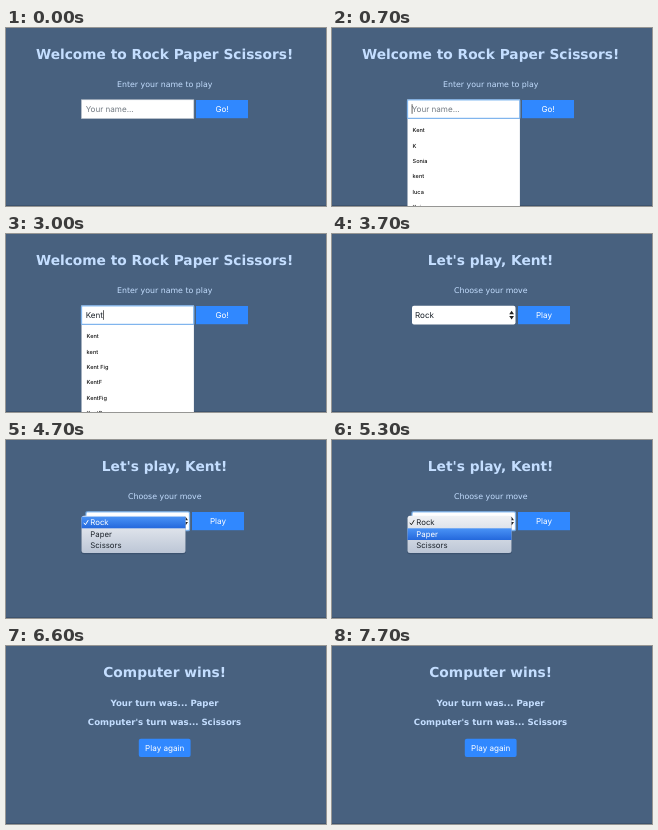
Write an HTML page that moves like this. It is 320x178 px and loops after 8 s.

```html
<!DOCTYPE html>
<html lang="en">
<head>
<meta charset="utf-8">
<title>Rock Paper Scissors</title>
<style>
html, body { margin: 0; height: 100%; overflow: hidden; background: #48617f; }
svg { display: block; width: 100vw; height: 100vh; }
text { font: 8.1px Inter, "Liberation Sans", sans-serif; fill: #1c232b; white-space: pre; text-rendering: geometricPrecision; }
.title, .label, .turn { font-family: "DejaVu Sans", Verdana, sans-serif; fill: #c4deff; text-anchor: middle; }
.title { font-size: 13.75px; font-weight: bold; }
.label { font-size: 7.85px; }
.turn { font-size: 8.6px; font-weight: bold; }
.button { fill: #fff; text-anchor: middle; }
.hint { fill: #747c84; }
.entry { font-size: 5.6px; font-weight: 500; fill: #111; }
.item { font-size: 7.8px; }
.lit { fill: #fff; }
</style>
</head>
<body>
<svg id="stage" viewBox="0 0 320 178" preserveAspectRatio="none"></svg>
<script>
const LOOP = 8000;
const NAME = "Kent";
const MOVES = ["Rock", "Paper", "Scissors"];
const ALL_NAMES = ["Kent", "K", "Sonia", "kent", "luca", "Kai"];
const K_NAMES = ["Kent", "K", "kent", "Kent Fig", "KentF", "KentFig"];
const KE_NAMES = ["Kent", "kent", "Kent Fig", "KentF", "KentFig", "KentB"];
const stage = document.getElementById("stage");

const gradient = (id, top, bottom) =>
  `<linearGradient id="${id}" x2="0" y2="1"><stop stop-color="${top}"/><stop offset="1" stop-color="${bottom}"/></linearGradient>`;
const DEFS = `<defs>${gradient("paper", "#f0f2f5", "#bcc6d6")}${gradient("glow", "#4a93f6", "#2468dc")}</defs>`;

const text = (x, y, s, cls = "", id = "") =>
  `<text x="${x}" y="${y}" class="${cls}" id="${id}">${s}</text>`;
const box = (x, y, w, h, fill, extra = "") =>
  `<rect x="${x}" y="${y}" width="${w}" height="${h}" fill="${fill}" ${extra}/>`;
const title = s => text(158.6, 31, s, "title");
const button = (x, y, w, s, r) =>
  box(x, y, w, 18.2, "#3088ff", `rx="${r}"`) + text(x + w / 2, y + 12.1, s, "button");
const ring = (x, y, w, h) =>
  box(x, y, w, h, "none", 'rx="1" stroke="#78b4f4" stroke-opacity=".85" stroke-width="1.3"');

function namePage({ typed, focus, caret, names, fade }) {
  let out = title("Welcome to Rock Paper Scissors!") + text(158.7, 59, "Enter your name to play", "label");
  out += box(75.5, 71.8, 112.3, 18.7, "#fff", 'stroke="#c3cad2" stroke-width=".6"');
  if (focus) out += ring(75.5, 71.8, 112.3, 18.7);
  out += typed ? text(79.7, 84.2, typed, "", "typed") : text(79.7, 84.2, "Your name...", "hint");
  if (caret) out += box(79.7, 76.2, .7, 9.6, "#222", 'id="caret"');
  out += button(190, 72, 52, "Go!", 0);
  if (names) {
    out += `<g opacity="${fade}">` + box(75.5, 91, 112.4, 90, "#fff") +
      names.map((n, i) => text(80.6, 104.1 + i * 15.4, n, "entry")).join("") + "</g>";
  }
  return out;
}

function menu(lit, opacity) {
  const rows = MOVES.map((m, i) => {
    const y = 76.6 + i * 11.7;
    return (i === lit ? box(75.5, y, 104, 11.7, "url(#glow)") : "") +
      text(84.3, y + 8.4, m, i === lit ? "item lit" : "item");
  }).join("");
  const tick = `<path d="M77.8 82.8l1.6 2 2.8-4.6" fill="none" stroke="${lit ? "#222" : "#fff"}" stroke-width="1"/>`;
  return `<g opacity="${opacity}">` +
    box(75, 76, 105, 38.2, "#243750", 'rx="3" opacity=".35"') +
    box(75.5, 75.7, 104, 37.3, "url(#paper)", 'rx="2.5"') + rows + tick + "</g>";
}

function movePage({ move, focus, lit, fade }) {
  let out = title(`Let's play, ${NAME}!`) + text(158.8, 59, "Choose your move", "label");
  out += box(80, 71.8, 103.5, 18.7, "#fff", 'rx="2"');
  if (focus) out += ring(80, 71.8, 103.5, 18.7);
  out += text(83, 84.2, MOVES[move]);
  out += '<path d="M177.2 80.2l2.4-3.4 2.4 3.4zM177.2 82l2.4 3.4 2.4-3.4z" fill="#222"/>';
  out += button(186, 72, 52, "Play", 0);
  return fade ? out + menu(lit, fade) : out;
}

const resultPage = () => title("Computer wins!") +
  text(158.5, 60, "Your turn was... Paper", "turn") +
  text(158.5, 78.8, "Computer's turn was... Scissors", "turn") +
  button(132.8, 92.7, 51.8, "Play again", 2);

function view(t) {
  if (t < 3200) {
    const length = [1500, 1600, 1900, 2000].filter(k => t >= k).length;
    return namePage({
      typed: NAME.slice(0, length),
      focus: t >= 600,
      caret: t >= 600 && t < 1200 || t >= 1500 && t < 2500 || t >= 3000,
      names: t < 600 ? null : length === 0 ? ALL_NAMES : length === 1 ? K_NAMES : KE_NAMES,
      fade: t < 3100 ? 1 : .4
    });
  }
  if (t < 6600) {
    return movePage({
      move: t < 5800 ? 0 : 1,
      focus: t >= 4700,
      lit: t < 5100 ? 0 : t >= 5500 && t < 5600 ? -1 : 1,
      fade: t < 4700 || t >= 5800 ? 0 : t < 5700 ? 1 : .35
    });
  }
  return resultPage();
}

let shown;
function draw(now) {
  const t = Math.floor(now % LOOP / 100) * 100;
  if (t !== shown) {
    shown = t;
    stage.innerHTML = DEFS + box(0, 0, 320, 178, "#48617f") + box(0, 177, 320, 1, "#3d536e") + view(t);
    const typed = document.getElementById("typed");
    const caret = document.getElementById("caret");
    if (typed && caret) caret.setAttribute("x", 79.9 + typed.getComputedTextLength());
  }
  requestAnimationFrame(draw);
}
draw(performance.now());
</script>
</body>
</html>
```
